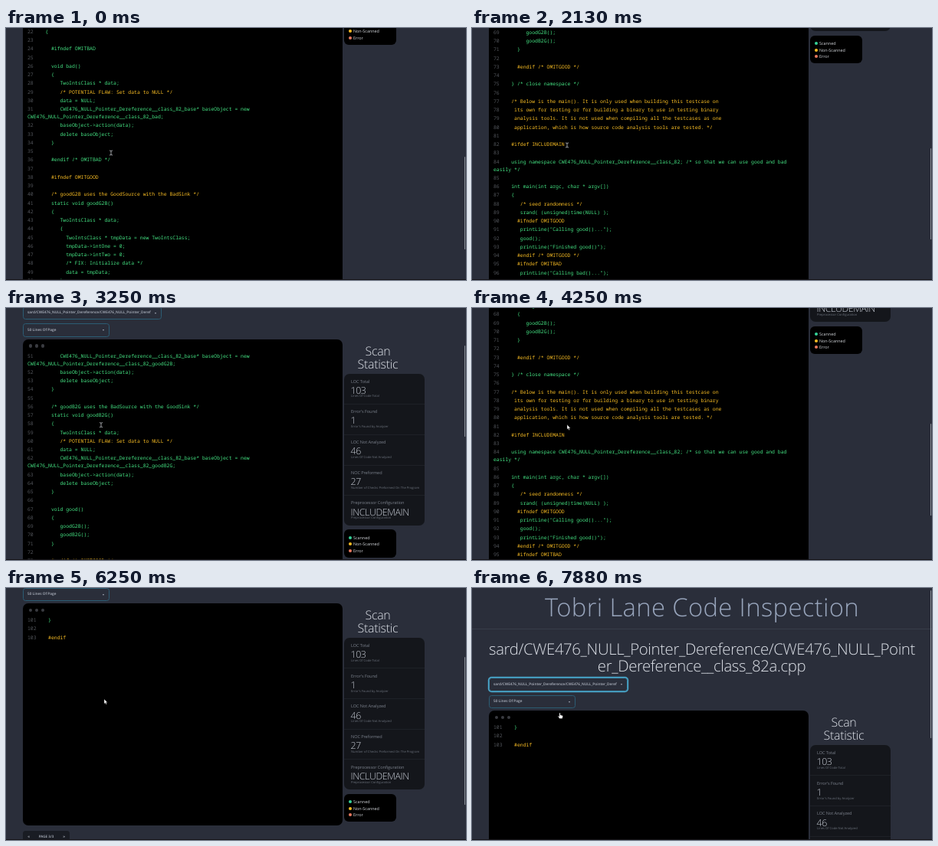
An HTML page that plays this animation: 600x329 px, repeating every 8 s.

```html
<!DOCTYPE html>
<html lang="en">
<head>
<meta charset="utf-8">
<title>Code scan</title>
<style>
  html, body { margin: 0; width: 100%; height: 100%; overflow: hidden; background: #2a2e3a; }
  #stage { position: relative; width: 600px; height: 329px; overflow: hidden; background: #2a2e3a;
    font-family: "Open Sans", "Noto Sans", sans-serif; color: #b0b6c2; text-rendering: geometricPrecision; }
  #stage * { box-sizing: border-box; }
  #page, #page div, #stage > div, svg { position: absolute; }
  #page { left: 0; top: 0; width: 600px; }
  .text { line-height: 0; white-space: pre; }
  .mid { transform: translateX(-50%); }
  .light { font-weight: 300; }
  .rule { left: 0; top: 53px; width: 600px; height: 1px; background: #383d49; }
  .select { left: 22px; border: 1px solid #2c5d74; border-radius: 3.5px; background: #2a2e3a; }
  .select.focus { border-color: #3d8fb0; box-shadow: 0 0 0 1.2px #4aa3c6; }
  .arrow { border: 1.6px solid transparent; border-top: 2px solid #a6adba; border-bottom: 0; }
  .window { left: 22px; top: 160px; width: 417px; background: #000; border-radius: 7px; }
  .dot { border-radius: 50%; }
  .code { left: 28px; top: 176.4px; font: 500 6.44px/10px "Noto Sans Mono", "DejaVu Sans Mono", monospace; color: #45e584; }
  #page .code p { margin: 0; padding: .625px 0; height: auto; white-space: pre; min-height: 11.25px; }
  .code .warn { color: #fbbf24; }
  .code span { color: #53565c; }
  .card { left: 441px; top: 205px; width: 105px; height: 198px; border-radius: 7px; background: #14161b; }
  .split { left: 441px; width: 105px; height: 1px; background: #1e2127; }
  .legend { left: 441px; top: 408.5px; width: 68px; height: 36.5px; border-radius: 6px; background: #000; }
  .pager { left: 22px; width: 61px; height: 16.5px; border-radius: 3.5px; background: #191c23; }
  #thumb { left: 597.8px; width: 1.6px; border-radius: 1px; background: #8f949d; }
  #edge { left: 0; top: 327.5px; width: 600px; height: 1.5px; background: #17161a; }
  svg { left: 0; top: 0; overflow: visible; }
</style>
</head>
<body>
<div id="stage">
  <div id="page"></div>
  <div id="thumb"></div>
  <div id="edge"></div>
  <svg width="10" height="10" id="pointer">
    <g id="beam" fill="none" stroke="#c9ccd2" stroke-width=".8">
      <path d="M-2 -3Q0 -3 0 -2Q0 -3 2 -3M0 -2V2M-2 3Q0 3 0 2Q0 3 2 3"/>
    </g>
    <g id="tip" fill="#fff" stroke="#111" stroke-width=".4">
      <path d="M0 0V6.2L1.4 5L2.4 7.1L3.5 6.6L2.5 4.6H4.4Z"/>
    </g>
    <g id="hand" fill="#fff" stroke="#111" stroke-width=".4">
      <path d="M-.7 .5Q0 -.6 .7 .5V2.7L3.5 3.4Q4.2 3.7 4 4.7L3.3 7.5H-.4L-2.3 4.6Q-2.1 3.6 -.7 4.7Z"/>
    </g>
  </svg>
</div>
<script>
// A leading "!" marks a line that was not scanned; "~" breaks a long line.
const LINES = `!/* TEMPLATE GENERATED TESTCASE FILE
!Filename: CWE476_NULL_Pointer_Dereference__class_82a.cpp
!Label Definition File: CWE476_NULL_Pointer_Dereference.label.xml
!Template File: sources-sinks-82a.tmpl.cpp
!*/
!/*
! * @description
! * CWE: 476 NULL Pointer Dereference
! * BadSource:  Set data to NULL
! * GoodSource: Initialize data
! * Sinks:
! *    GoodSink: Check for NULL before attempting to print data
! *    BadSink : Print data
! * Flow Variant: 82 Data flow: data passed in a parameter to a virtual method called via a~pointer
! *
! * */

#include "std_testcase.h"
#include "CWE476_NULL_Pointer_Dereference__class_82.h"

namespace CWE476_NULL_Pointer_Dereference__class_82
{

  #ifndef OMITBAD

  void bad()
  {
     TwoIntsClass * data;
!     /* POTENTIAL FLAW: Set data to NULL */
     data = NULL;
     CWE476_NULL_Pointer_Dereference__class_82_base* baseObject = new~CWE476_NULL_Pointer_Dereference__class_82_bad;
     baseObject->action(data);
     delete baseObject;
  }

  #endif /* OMITBAD */

!  #ifndef OMITGOOD

!  /* goodG2B uses the GoodSource with the BadSink */
  static void goodG2B()
  {
     TwoIntsClass * data;
     {
       TwoIntsClass * tmpData = new TwoIntsClass;
       tmpData->intOne = 0;
       tmpData->intTwo = 0;
       /* FIX: Initialize data */
       data = tmpData;
     }
     CWE476_NULL_Pointer_Dereference__class_82_base* baseObject = new~CWE476_NULL_Pointer_Dereference__class_82_goodG2B;
     baseObject->action(data);
     delete baseObject;
  }

  /* goodB2G uses the BadSource with the GoodSink */
  static void goodB2G()
  {
     TwoIntsClass * data;
!     /* POTENTIAL FLAW: Set data to NULL */
     data = NULL;
     CWE476_NULL_Pointer_Dereference__class_82_base* baseObject = new~CWE476_NULL_Pointer_Dereference__class_82_goodB2G;
     baseObject->action(data);
     delete baseObject;
  }

  void good()
  {
     goodG2B();
     goodB2G();
  }

!  #endif /* OMITGOOD */

} /* close namespace */

!/* Below is the main(). It is only used when building this testcase on
! its own for testing or for building a binary to use in testing binary
! analysis tools. It is not used when compiling all the testcases as one
! application, which is how source code analysis tools are tested. */

!#ifdef INCLUDEMAIN

using namespace CWE476_NULL_Pointer_Dereference__class_82; /* so that we can use good and bad~easily */

int main(int argc, char * argv[])
{
!   /* seed randomness */
   srand( (unsigned)time(NULL) );
!  #ifndef OMITGOOD
   printLine("Calling good()...");
   good();
   printLine("Finished good()");
!  #endif /* OMITGOOD */
!  #ifndef OMITBAD
   printLine("Calling bad()...");
   bad();
   printLine("Finished bad()");
!  #endif /* OMITBAD */
   return 0;
}

!#endif`.split("\n");

const STEP = 125, LOOP = 8000, PER_PAGE = 50;
const byId = id => document.getElementById(id);
const page = byId("page");

function box(cls, style = {}, parent = page) {
  const el = document.createElement("div");
  el.className = cls;
  for (const key in style) {
    const v = style[key];
    el.style[key] = typeof v === "number" ? v + "px" : v;
  }
  parent.append(el);
  return el;
}

// y is the vertical middle of the text
function text(str, x, y, size, { cls = "", parent = page, ...style } = {}) {
  const el = box("text " + cls, { left: x, top: y, fontSize: size, ...style }, parent);
  el.textContent = str;
  return el;
}

const dot = (x, y, r, background) =>
  box("dot", { left: x - r, top: y - r, width: 2 * r, height: 2 * r, background });

function select(label, top, width) {
  const el = box("select", { top, width, height: 17.5 });
  text(label, 28, top + 8.7, 4.74, { fontWeight: "600" });
  box("arrow", { left: width + 12.5, top: top + 8 });
  return el;
}

// Headings and selects
text("Tobri Lane Code Inspection", 300, 24.5, 32.8,
  { cls: "mid", fontWeight: "350", color: "#98a5bc", letterSpacing: ".35px" });
box("rule");
const heading = { cls: "mid light", color: "#dde1e8", letterSpacing: "-.4px" };
text("sard/CWE476_NULL_Pointer_Dereference/CWE476_NULL_Point", 300, 78.5, 20.4, heading);
text("er_Dereference__class_82a.cpp", 299.5, 100.5, 20.4, heading);
const pathSelect = select("sard/CWE476_NULL_Pointer_Dereference/CWE476_NULL_Pointer_Deref", 117, 181);
select("50 Lines Of Page", 139.5, 113);

// Statistics
["Scan", "Statistic"].forEach((s, i) =>
  text(s, 485, 175 + 17 * i, 16, { cls: "mid light", color: "#dde1e8", letterSpacing: "-.3px" }));
box("card");
[
  ["LOC Total", "103", "Lines Of Code Total"],
  ["Error's Found", "1", "Error's Found by Analyzer"],
  ["LOC Not Analyzed", "46", "Lines Of Code Not Analyzed"],
  ["NOC Preformed", "27", "Number of Checks Preformed On The Program"],
  ["Preprocessor Configuration", "INCLUDEMAIN", "Preprocessor Configuration"],
].forEach(([name, value, note], i) => {
  const y = 215 + 39.7 * i;
  if (i) box("split", { top: Math.round(y - 10.5) });
  text(name, 450, y, 5.6, { color: "#7b818c", letterSpacing: "-.08px" });
  text(value, 449.5, y + 12.2, 12.4, { cls: "light", color: "#c5cad3", letterSpacing: "-.4px" });
  text(note, 450, y + 20.9, 4.1, { color: "#6c727c" });
});
box("legend");
[["Scanned", "#36d399"], ["Non-Scanned", "#fbbd23"], ["Error", "#e9795f"]].forEach(([name, color], i) => {
  dot(449, 419 + 8.5 * i, 2, color);
  text(name, 453, 419 + 8.5 * i, 5.4, { color: "#d6d9de" });
});

// Code window with three pages
const frame = box("window");
[32, 40, 48].forEach(x => dot(x, 169, 2.3, "#3a3c41"));

const sheets = [0, 1, 2].map(n => {
  const code = box("code");
  const lines = LINES.slice(n * PER_PAGE, (n + 1) * PER_PAGE);
  let height = 0;
  lines.forEach((line, i) => {
    const row = document.createElement("p");
    const num = document.createElement("span");
    const warn = line.startsWith("!");
    if (warn) row.className = "warn";
    num.textContent = n * PER_PAGE + i + 1;
    row.append(num, "    " + line.slice(warn).replace("~", "\n"));
    code.append(row);
    height += line.includes("~") ? 21.25 : 11.25;
  });
  const end = Math.max(450, 176.4 + height + 6.5);
  return { code, end, total: end + 79 };
});

const footer = box("");
box("pager", { top: 6.5 }, footer);
const foot = (str, x, y, size, style) => text(str, x, y, size, { parent: footer, ...style });
foot("«", 28.3, 14.5, 5, { fontWeight: "600" });
const pageLabel = foot("", 52.5, 15, 4.6, { cls: "mid", fontWeight: "600" });
foot("»", 74.2, 14.5, 5, { fontWeight: "600" });
const result = foot("Scan Result: ", 22.5, 36.5, 7, { cls: "light", color: "#dde1e8", letterSpacing: "-.1px" });
const percent = document.createElement("span");
percent.textContent = "100%";
percent.style.color = "#36d399";
result.append(percent);

// Motion tables: step, values...
const SCROLL = [[0, 423.5], [3, 515.5], [14, 515.5], [21, 243], [26, 119.5], [28, 119.5], [34, 385],
  [39, 526], [45, 526], [46, 201], [49, 201], [50, 140], [55, 0]];
const POINTER = [[0, 137, 163, "beam"], [3, 137, 163, "tip"], [7, 71.5, 266, "hand"], [12, 71.5, 266, "tip"],
  [16, 124, 153, "beam"], [30, 124, 152.5, "tip"], [39, 124, 152, "tip"], [42, 75, 265, "hand"],
  [47, 75, 265, "tip"], [50, 128, 145, "tip"], [54, 128, 145, "tip"], [57, 115, 126, "tip"],
  [60, 115, 126, "tip"], [62, 114.5, 163, "hand"]];

function at(table, k) {
  let i = table.length - 1;
  while (table[i][0] > k) i--;
  const a = table[i], b = table[i + 1] || a;
  const u = b === a ? 0 : (k - a[0]) / (b[0] - a[0]);
  return a.slice(1).map((v, j) => typeof v === "number" ? v + (b[j + 1] - v) * u : v);
}

function draw(ms) {
  const k = Math.floor((ms % LOOP) / STEP);
  const n = k < 10 ? 0 : k < 46 ? 1 : 2;
  const { end, total } = sheets[n];
  const [scroll] = at(SCROLL, k);
  const [x, y, kind] = at(POINTER, k);

  sheets.forEach((s, i) => s.code.style.display = i === n ? "" : "none");
  frame.style.height = end - 160 + "px";
  footer.style.top = end + "px";
  pageLabel.textContent = `PAGE ${n + 1}/3`;
  page.style.top = -scroll + "px";
  pathSelect.classList.toggle("focus", k >= 59);

  const bar = byId("thumb").style;
  bar.top = 3 + scroll / total * 329 + "px";
  bar.height = 328 / total * 311 + "px";

  byId("pointer").style.transform = `translate(${x}px, ${y}px)`;
  for (const id of ["beam", "tip", "hand"]) byId(id).style.display = id === kind ? "" : "none";
}

const start = performance.now();
function tick() {
  draw(performance.now() - start);
  requestAnimationFrame(tick);
}
tick();
</script>
</body>
</html>
```
